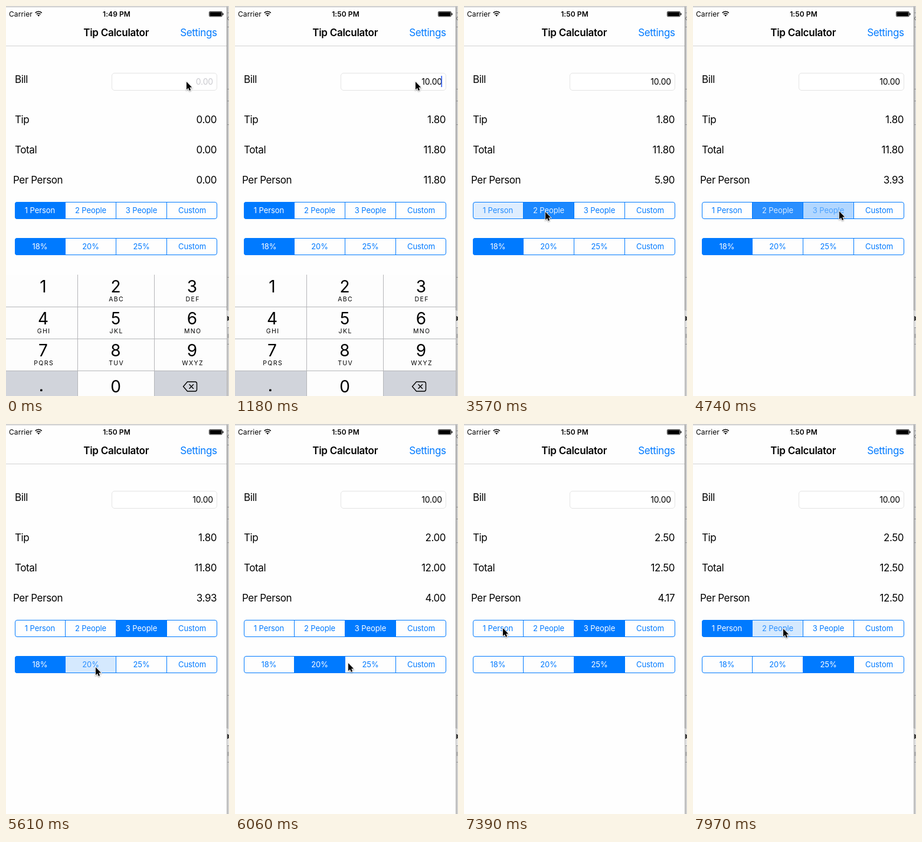
An HTML page for the animation above (8 s loop, 378 px wide and 659 px high).

```html
<!DOCTYPE html>
<html lang="en">
<head>
<meta charset="utf-8">
<title>Tip Calculator</title>
<style>
  html, body { margin: 0; width: 100%; height: 100%; overflow: hidden; background: #fefefe; }
  svg { display: block; width: 378px; height: 659px; }
  text { font: 400 17px Inter, "Open Sans", sans-serif; letter-spacing: -.4px; fill: #000; white-space: pre; }
  .mid { text-anchor: middle; }
  .end { text-anchor: end; }
  .bold { font-weight: 600; }
  .title { letter-spacing: -.27px; }
  .link { fill: #007aff; }
  .status { font-size: 12px; letter-spacing: .08px; }
  .field { font-size: 14px; letter-spacing: -.15px; }
  .seg { font-size: 13px; letter-spacing: -.08px; }
  .digit { font-size: 28px; letter-spacing: 0; }
  .abc { font-size: 10.5px; letter-spacing: 1.4px; }
  #cursor { filter: drop-shadow(0 1px 1px rgba(0, 0, 0, .4)); }
</style>
</head>
<body>
<svg id="stage" viewBox="0 0 378 659" xmlns="http://www.w3.org/2000/svg"></svg>
<script>
const LOOP = 8000;
const TICK = 147.7; // the picture holds still for one tick
const FADE = 1.2;   // segment crossfade, in ticks
const BLUE = [0, 122, 255];
const SEG_W = 86;
const labels = {
  people: ['1 Person', '2 People', '3 People', 'Custom'],
  rates: ['18%', '20%', '25%', 'Custom']
};

// All times below are in ticks.
const CLOCK_TURNS = 8, KEYPAD_CLOSES = 15;
const BILL = '10.00', keyTimes = [2, 3, 5, 6, 6];
const moves = [ // x, y, start, end
  [306, 128, 0, 0], [271, 202, 9, 13], [204, 314, 14, 15], [138, 348, 15, 22],
  [190, 359, 24, 26], [248, 347, 26, 27], [152, 411, 33, 37], [192, 404, 39, 41],
  [228, 403, 41, 43], [66, 345, 45, 50], [153, 346, 51, 53]
];
const taps = [ // row, segment, release
  ['people', 1, 22.95], ['people', 2, 31.8], ['rates', 1, 38.95],
  ['rates', 2, 43.2], ['people', 0, 51.3], ['people', 1, 54.5]
];

const text = (x, y, s, cls = '', id = '') => `<text x="${x}" y="${y}" class="${cls}" id="${id}">${s}</text>`;
const rect = (x, y, w, h, fill, more = '') => `<rect x="${x}" y="${y}" width="${w}" height="${h}" fill="${fill}" ${more}/>`;
const line = (d, stroke, width = 1) => `<path d="${d}" fill="none" stroke="${stroke}" stroke-width="${width}"/>`;

// Sliver of the window behind the phone
function backdrop() {
  const edges = [11, 35, 140, 160, 200, 458, 543, 571].map(y => `M375 ${y}.5h3`).join('');
  return '<linearGradient id="shade"><stop stop-color="#b4b4b4"/><stop offset="1" stop-color="#d8d8d8"/></linearGradient>' +
    rect(0, 0, 378, 659, '#fefefe') + rect(0, 0, 378, 2, '#d2d2d2') + rect(0, 2, 375, 1, '#efefef') +
    rect(374, 0, 4, 659, 'url(#shade)') + rect(375, 515, 3, 28, '#e2e2e2') +
    line(edges, '#999') + line('M374.5 2V514', '#8d8d8d') +
    line('M378 18.5q-2.5 0-2.5 2.5t2.5 2.5', '#777') +
    line('M375.7 524v8M377.5 525v6', '#222', 1.4) + line('M376.5 554v7', '#888');
}

function statusBar() {
  return text(5, 18, 'Carrier', 'status') +
    line('M49.7 11.6a7.6 7.6 0 0 1 11 0M51.8 13.9a4.7 4.7 0 0 1 6.8 0', '#000', 1.6) +
    '<path d="M55.2 17.8l-2-2.2a2.9 2.9 0 0 1 4 0z"/>' +
    text(187.5, 18, '', 'status bold mid', 'clock') +
    rect(344.4, 9.4, 22, 8.4, '#fff', 'rx="1.6" stroke="#000" stroke-width=".8"') +
    rect(345.3, 10.3, 20.2, 6.6, '#000', 'rx=".8"') + rect(367.2, 12, 1.4, 3.4, '#000', 'rx=".7"');
}

function segments(name, y) {
  const x = i => 14.5 + SEG_W * i;
  const cells = labels[name].map((_, i) => rect(x(i), y, SEG_W, 29, '#007aff', `id="${name}-bg${i}"`));
  const words = labels[name].map((s, i) => text(x(i) + 43, y + 19, s, 'seg mid', `${name}-fg${i}`));
  return `<clipPath id="${name}-clip">${rect(15, y, 343, 29, '#000', 'rx="4"')}</clipPath>` +
    `<g clip-path="url(#${name}-clip)">${cells.join('')}</g>` +
    rect(15.5, y + .5, 342, 28, 'none', 'rx="3.5" stroke="#007aff"') +
    line([1, 2, 3].map(i => `M${x(i)} ${y}v29`).join(''), '#007aff') + words.join('');
}

function keypad() {
  const cols = [63, 186, 315.5];
  const letters = ['', 'ABC', 'DEF', 'GHI', 'JKL', 'MNO', 'PQRS', 'TUV', 'WXYZ'];
  const keys = letters.map((s, i) => {
    const x = cols[i % 3], y = 484 + 54 * Math.floor(i / 3);
    return text(x, y, i + 1, 'digit mid') + text(x + 1.2, y + 15, s, 'abc mid');
  });
  return '<g id="keypad">' + rect(0, 454, 374, 205, '#fdfdfd') +
    rect(0, 617, 121, 42, '#d1d4db') + rect(252, 617, 122, 42, '#d1d4db') +
    line('M0 508.5H374M0 562.5H374M0 616.5H374M121.5 454V659M251.5 454V659', '#b5b6b9') +
    keys.join('') + text(186, 653, '0', 'digit mid') + rect(58, 647.5, 3.6, 3.6, '#000', 'rx="1"') +
    line('M307.5 635H320.5Q323.5 635 323.5 638V648Q323.5 651 320.5 651H307.5L300.5 643ZM310.5 639.3l7.4 7.4M317.9 639.3l-7.4 7.4', '#000', 1.4) +
    '</g>';
}

const results = [['Tip', 15, 198, 'tip'], ['Total', 15, 249, 'total'], ['Per Person', 12, 300, 'each']];
document.getElementById('stage').innerHTML = backdrop() + statusBar() +
  text(186.7, 51, 'Tip Calculator', 'bold title mid') + text(357.5, 51, 'Settings', 'link end') +
  line('M0 67.5H374', '#d2d2d2') +
  text(15, 130, 'Bill') +
  rect(179.5, 113.5, 178, 29, '#fff', 'rx="4.5" stroke="#e4e4e4"') +
  text(351, 133, '', 'field end', 'bill') + rect(349.3, 118, 1.8, 19, '#426bf2', 'id="caret"') +
  results.map(([s, x, y, id]) => text(x, y, s) + text(357.2, y, '', 'end', id)).join('') +
  segments('people', 331) + segments('rates', 392) + keypad() +
  '<path id="cursor" d="M0 0V13.2L3 10.4 4.9 15 7.1 14.1 5.3 9.6H9.2Z" stroke="#fff" stroke-width="1.6" paint-order="stroke"/>';

const $ = id => document.getElementById(id);
const clamp = v => Math.min(1, Math.max(0, v));
const smooth = v => v * v * (3 - 2 * v);
const show = (id, on) => $(id).setAttribute('visibility', on ? 'visible' : 'hidden');
const write = (id, s) => { if ($(id).textContent !== s) $(id).textContent = s; };
const blend = p => `rgb(${BLUE.map(c => Math.round(c + (255 - c) * p))})`;

function pointerAt(k) {
  let x = 0, y = 0;
  for (const [toX, toY, start, end] of moves) {
    if (k < start) break;
    const p = smooth(clamp((k - start) / (end - start || 1) + (end === start)));
    x += (toX - x) * p;
    y += (toY - y) * p;
  }
  return [x, y];
}

// Each segment is tinted while held, then crossfades on release.
function choicesAt(k) {
  const fill = { people: [1, 0, 0, 0], rates: [1, 0, 0, 0] };
  const picked = { people: 0, rates: 0 };
  for (const [row, to, release] of taps) {
    if (k < release - 1) continue;
    const p = clamp((k - release) / FADE);
    fill[row][to] = .16 + .84 * p;
    if (k < release) continue;
    fill[row][picked[row]] = 1 - p;
    picked[row] = to;
  }
  return { fill, picked };
}

function draw(k) {
  const { fill, picked } = choicesAt(k);
  for (const row in fill) fill[row].forEach((p, i) => {
    $(`${row}-bg${i}`).setAttribute('opacity', p);
    $(`${row}-fg${i}`).style.fill = blend(p);
  });

  const entry = BILL.slice(0, keyTimes.filter(at => at <= k).length);
  const bill = Number(entry);
  const tip = bill * parseInt(labels.rates[picked.rates]) / 100;
  write('bill', entry || '0.00');
  $('bill').style.fill = entry ? '#000' : '#c9c9ce';
  write('tip', tip.toFixed(2));
  write('total', (bill + tip).toFixed(2));
  write('each', ((bill + tip) / (picked.people + 1)).toFixed(2));

  const editing = k < KEYPAD_CLOSES;
  const blinkedOff = k < 1 || (k >= 10 && k < 13);
  write('clock', k < CLOCK_TURNS ? '1:49 PM' : '1:50 PM');
  show('caret', editing && !blinkedOff);
  show('keypad', editing);
  $('cursor').setAttribute('transform', `translate(${pointerAt(k)})`);
}

const start = performance.now();
function frame() {
  const t = (performance.now() - start) % LOOP;
  draw(Math.floor((t + 8) / TICK));
  requestAnimationFrame(frame);
}
frame();
</script>
</body>
</html>
```
